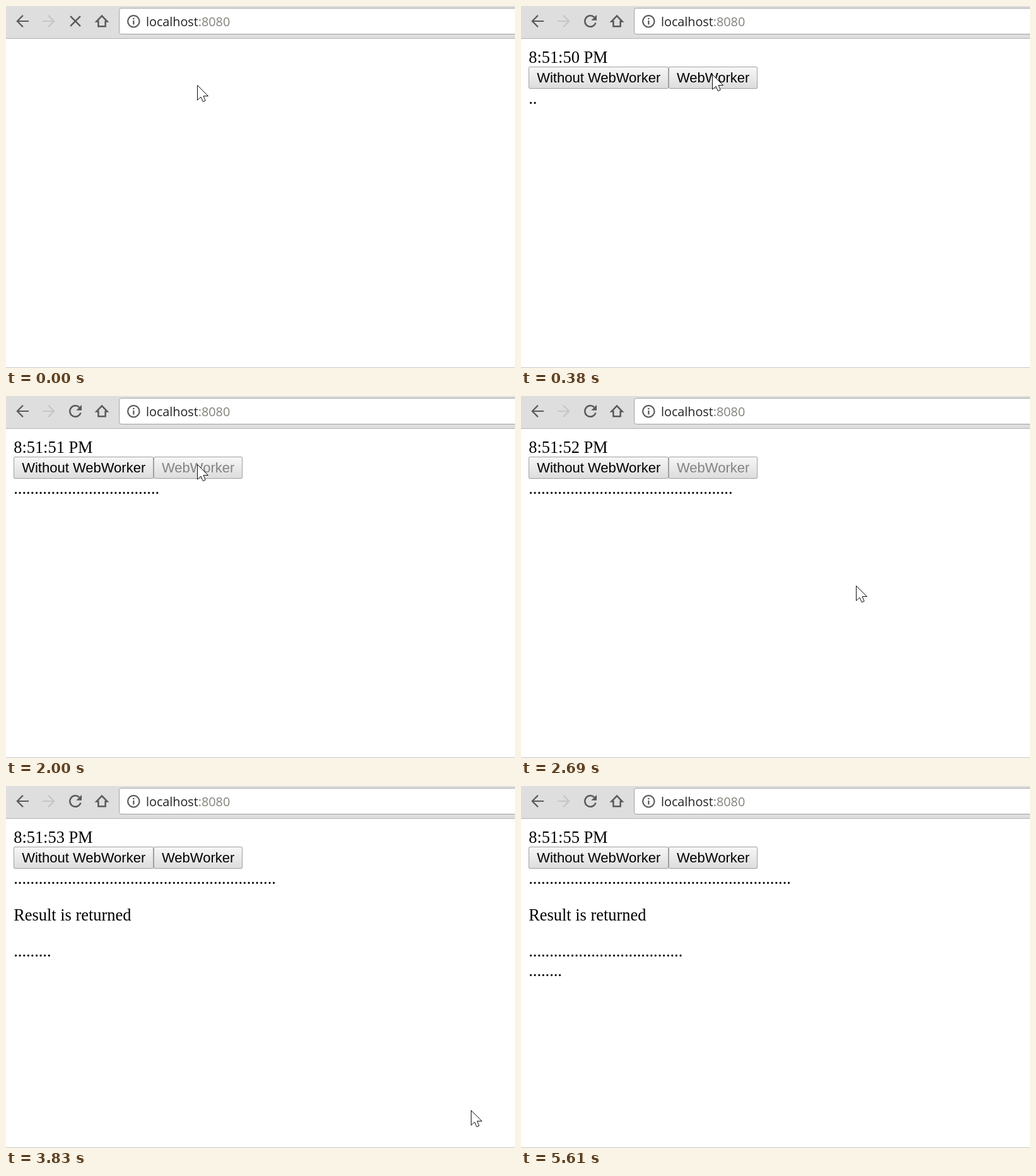
Animation of 807 by 573 pixels, one loop 5700 ms. Source, as an HTML page:

```html
<!DOCTYPE html>
<html lang="en">
<head>
<meta charset="utf-8">
<title>Web worker demo</title>
<style>
  html, body { margin: 0; width: 100%; height: 100%; overflow: hidden; background: #fff; }
  svg { display: block; width: 807px; height: 573px; }
  .icon { fill: none; stroke: #5a5a5a; stroke-width: 2.5; }
  .thin { stroke-width: 2.2; }
  .off { stroke: #c6c6c6; }
  .url { font: 19.75px "Open Sans", "Noto Sans", sans-serif; fill: #222; }
  .url tspan { fill: #80837a; }
  .page { font: 26.4px "Liberation Serif", "Times New Roman", serif; }
  .button { font: 22px "Liberation Sans", Arial, sans-serif; font-kerning: normal; }
  .button rect { fill: url(#up); stroke: #a0a0a0; }
  .pressed rect { fill: url(#down); }
  .disabled text { fill: #838383; }
</style>
</head>
<body>
<svg viewBox="0 0 807 573">
  <defs>
    <linearGradient id="up" x2="0" y2="1">
      <stop stop-color="#f7f7f7"/><stop offset="1" stop-color="#dcdcdc"/>
    </linearGradient>
    <linearGradient id="down" x2="0" y2="1">
      <stop stop-color="#dcdcdc"/><stop offset="1" stop-color="#f8f8f8"/>
    </linearGradient>
  </defs>

  <rect width="807" height="51" fill="#dedede"/>
  <rect y="51" width="807" height="1" fill="#b4b4b4"/>
  <rect y="572" width="807" height="1" fill="#c6c6c6"/>
  <rect x="179.5" y="3.5" width="650" height="41" rx="3.5" fill="#fff" stroke="#a3a3a3"/>

  <path class="icon thin" d="M36 24H18M26.9 14.9L17.8 24l9.1 9.1"/>
  <path class="icon thin off" d="M58 24h18M67.1 14.9l9.1 9.1l-9.1 9.1"/>
  <path class="icon" id="stop" d="M102.1 16.1l15.8 15.8M117.9 16.1l-15.8 15.8"/>
  <g id="reload">
    <path class="icon" d="M118.4 26.5A8.75 8.75 0 1 1 116.2 17.8"/>
    <path d="M111.3 22.75H120V14z" fill="#5a5a5a"/>
  </g>
  <path class="icon" d="M152 15.6l-8.6 9h3v7.6h11.2v-7.6h3z"/>
  <circle class="icon thin" cx="202.3" cy="24.3" r="9.2"/>
  <path d="M201.2 23h2.3v6.2h-2.3zM201.2 19h2.3v2.3h-2.3z" fill="#5a5a5a"/>
  <text class="url" x="222" y="32">localhost<tspan>:8080</tspan></text>

  <g id="page" class="page">
    <text id="clock" x="12.2" y="90"></text>
    <g class="button">
      <rect x="12.5" y="96.5" width="221" height="34" rx="1.5"/>
      <text x="25.2" y="121">Without WebWorker</text>
    </g>
    <g class="button" id="worker">
      <rect x="234.5" y="96.5" width="140" height="34" rx="1.5"/>
      <text x="247" y="121">WebWorker</text>
    </g>
    <text id="before" x="12.2" y="155"></text>
    <text id="result" x="12.2" y="213">Result is returned</text>
    <text id="after" x="12.2" y="270"></text>
    <text id="wrapped" x="12.2" y="301"></text>
  </g>

  <path id="cursor" d="M.5 .5V24L6 19l3.3 7.5l3.9-1.6L10 17.5h7.5z" fill="#fff" stroke="#111"/>
</svg>
<script>
  const LOOP = 5700, STEP = 76.7, LAST = 73;
  const RESULT_AT = 63, WRAP_AT = 37;
  // step, x, y
  const path = [
    [0, 303, 125], [2, 303, 108], [26, 303, 108], [27, 317, 122],
    [35, 531, 300], [43, 667, 412], [50, 737, 513], [51, 741, 548]
  ];
  const el = id => document.getElementById(id);
  const show = (id, on) => el(id).style.display = on ? '' : 'none';
  const dots = (id, n) => el(id).textContent = '.'.repeat(Math.max(0, n));

  function cursorAt(n) {
    const i = path.findIndex(p => p[0] >= n);
    if (i <= 0) return path[0].slice(1);
    const [n0, x0, y0] = path[i - 1], [n1, x1, y1] = path[i];
    const k = (n - n0) / (n1 - n0);
    return [Math.round(x0 + (x1 - x0) * k), Math.round(y0 + (y1 - y0) * k)];
  }

  function draw(n) {
    show('stop', n < 1);
    show('reload', n >= 1);
    show('page', n >= 4);

    const total = Math.floor(2.82 + 1.559 * (n - 5));
    const done = total > RESULT_AT;
    const rest = total - RESULT_AT;
    dots('before', Math.min(total, RESULT_AT));
    dots('after', Math.min(rest, WRAP_AT));
    dots('wrapped', rest - WRAP_AT);
    show('result', done);

    const seconds = 50 + Math.max(0, Math.floor((n - 3.1) / 12.9));
    el('clock').textContent = `8:51:${seconds} PM`;

    const state = n < 14 || done ? '' : n < 16 ? 'pressed' : 'disabled';
    el('worker').setAttribute('class', `button ${state}`);

    const visible = n <= path[path.length - 1][0];
    show('cursor', visible);
    if (visible) el('cursor').setAttribute('transform', `translate(${cursorAt(n)})`);
  }

  const start = performance.now();
  function tick() {
    const t = (performance.now() - start) % LOOP;
    draw(Math.min(LAST, Math.floor((t + 8) / STEP)));
    requestAnimationFrame(tick);
  }
  tick();
</script>
</body>
</html>
```
